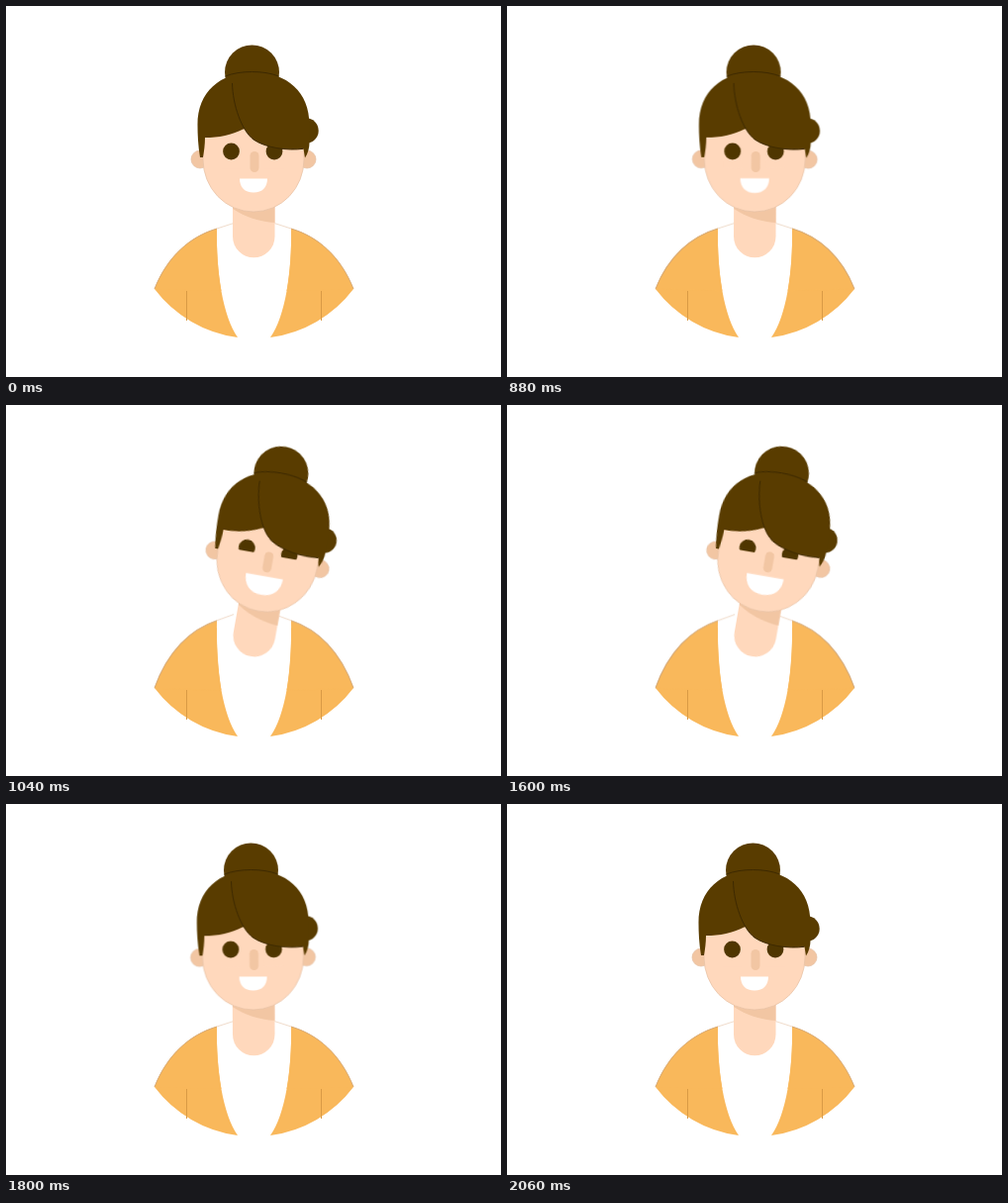
Write an HTML page that moves like this. It is 500x375 px and loops after 2.4 s.

```html
<!DOCTYPE html>
<html lang="en">
<head>
<meta charset="utf-8">
<title>Smiling woman</title>
<style>
  html, body { margin: 0; width: 100%; height: 100%; overflow: hidden; background: #fff; }
  svg { display: block; width: 100%; height: 100%; }

  .head, .eyes, .cheeks, .mouth, .shoulders {
    animation: 2400ms cubic-bezier(.5, 0, .5, 1) infinite;
  }
  .head   { transform-origin: 250px 236px; animation-name: tilt; }
  .eyes   { transform-origin: 250px 147px; animation-name: blink; animation-timing-function: linear; }
  .cheeks { animation-name: squint; }
  .mouth  { transform-origin: 250px 181.6px; animation-name: smile; }
  .shoulders { transform-origin: 250px 286px; animation-name: shrug; }

  .skin   { fill: #ffd8bc; }
  .shade  { fill: #f2c6a3; }
  .hair   { fill: #593c00; }
  .cloth  { fill: #f9b85b; }
  .strand { fill: none; stroke: #3d2900; stroke-width: 1; }
  .edge   { stroke: #e6c1a4; stroke-width: .7; }

  @keyframes tilt {
    0%, 35.833%      { transform: rotate(0deg); }
    43.333%, 65.833% { transform: rotate(10deg); }
    75%              { transform: rotate(-.35deg); }
    85.833%, 100%    { transform: rotate(0deg); }
  }
  @keyframes blink {
    0%, 10%          { transform: scaleY(1); }
    12.5%, 13.333%   { transform: scaleY(.1); }
    15.833%, 100%    { transform: scaleY(1); }
  }
  @keyframes squint {
    0%, 35.833%      { transform: translateY(6px); }
    43.333%, 65.833% { transform: translateY(0); }
    74%, 100%        { transform: translateY(6px); }
  }
  @keyframes smile {
    0%               { transform: scale(1); }
    35.833%          { transform: scale(1); animation-timing-function: linear; }
    43.333%, 65.833% { transform: scale(1.35); }
    75%, 100%        { transform: scale(1); }
  }
  @keyframes shrug {
    0%, 35.833%      { transform: scaleY(1); }
    43.333%, 65.833% { transform: scaleY(1.117); }
    75%, 100%        { transform: scaleY(1); }
  }
</style>
</head>
<body>
<svg viewBox="0 0 500 375">
  <defs>
    <path id="side" class="cloth" d="M213 225C212 268 219 314 234 335A126 126 0 0 1 150 286C163 253 186 233 213 225Z"/>
    <g id="shoulder">
      <path class="cloth" d="M213 225C212.5 246 214 269 217.5 288L150 286C163 253 186 233 213 225Z"/>
      <path d="M150 286C163 253 186 233 213 225" fill="none" stroke="#d6aa78"/>
      <path d="M213 225L230 219.5" stroke="#ecd2bd" stroke-width=".8"/>
    </g>
    <path id="sleeve" d="M182.5 288V318" stroke="#d99a45"/>
  </defs>

  <use href="#side"/>
  <use href="#side" transform="translate(501 0) scale(-1 1)"/>
  <g class="shoulders">
    <use href="#shoulder"/>
    <use href="#shoulder" transform="translate(501 0) scale(-1 1)"/>
  </g>
  <use href="#sleeve"/>
  <use href="#sleeve" transform="translate(501 0) scale(-1 1)"/>

  <g class="head">
    <path class="skin" d="M229 190H271.5V233A21.25 21.25 0 0 1 229 233Z"/>
    <path class="shade" d="M229 195H271.5V219C256 218 241 213 229 205Z"/>

    <circle class="shade edge" cx="196" cy="155" r="9"/>
    <circle class="shade edge" cx="304" cy="155" r="9"/>
    <path class="skin edge" d="M199 110H301V155A51 53 0 0 1 199 155Z"/>

    <g class="eyes" fill="#4f3600">
      <circle cx="227.5" cy="147" r="8.4"/>
      <circle cx="271" cy="147" r="8.4"/>
    </g>
    <g class="cheeks skin">
      <rect x="218" y="150.2" width="19" height="8"/>
      <rect x="261.5" y="150.2" width="19" height="8"/>
    </g>
    <rect class="shade" x="246.5" y="147" width="9" height="21" rx="4.5"/>
    <path class="mouth" fill="#fff" d="M236 174.5H264C264 183 259 188.6 250 188.6S236 183 236 174.5Z"/>

    <circle class="hair" cx="248.5" cy="67" r="27.5"/>
    <path class="hair" d="M196 153C194 141 193.5 130 193.5 120C193.5 87 216 67 250 67L255 120L239.5 124.5C228 130.5 215 133 201 133C201 140 200 147 199 153Z"/>
    <circle class="hair" cx="303" cy="126" r="12.7"/>
    <path class="hair" d="M228 77C235 70 243 67 250 67C284 67 306.5 87 306.5 120V138C306.5 143 305 149 302 153.5L300.5 144.3C285 146.5 262 143.5 250 135C238 126 229 100 228 77Z"/>
    <path class="strand" d="M221.5 71C236 65 261 65 275.5 71"/>
    <path class="strand" d="M228.5 78C229 100 238 126 250 135C262 143.5 285 146.5 300.5 144.3"/>
  </g>
</svg>
</body>
</html>
```
